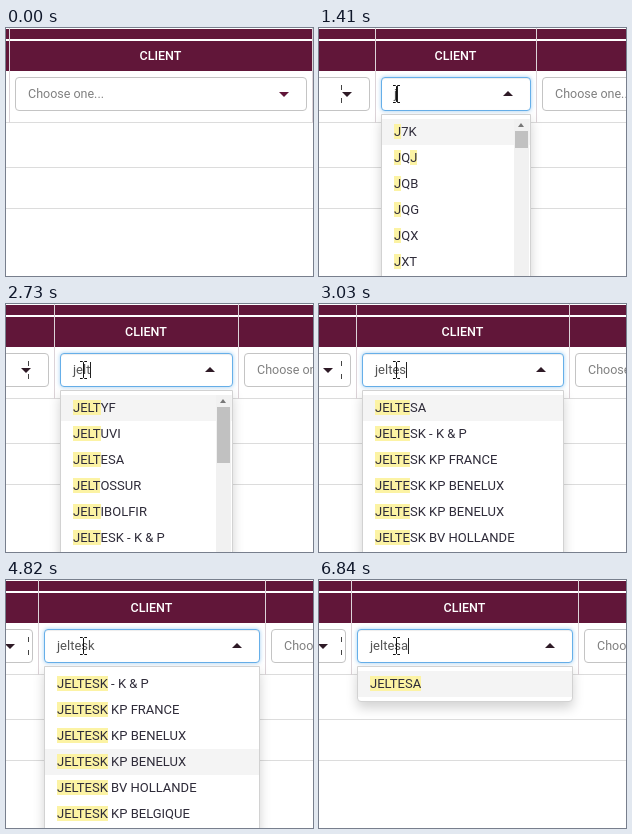
An HTML page for the animation above (6.92 s loop, 307 px wide and 248 px high).

```html
<!DOCTYPE html>
<html lang="en">
<head>
<meta charset="utf-8">
<title>Client picker</title>
<style>
  * { box-sizing: border-box; }
  html, body { margin: 0; width: 100%; height: 100%; overflow: hidden; background: #fff; }
  #stage {
    --l: 3px; --r: 306px;
    position: relative; width: 307px; height: 248px; overflow: hidden;
    background: #fff; color: #2f2c3a; font: 13px Roboto, sans-serif;
  }
  #stage div, #stage svg { position: absolute; }
  .band { left: 0; width: 100%; background: #611639; }
  .rule { left: 0; width: 100%; height: 1px; background: #dcdcdc; }
  .edge { top: 0; width: 1px; height: 95px; background: #dcd3d8; }
  .title {
    top: 13px; left: var(--l); width: calc(var(--r) - var(--l)); line-height: 29px;
    text-align: center; color: #fff; font-size: 12.5px; font-weight: 500;
  }
  .box {
    top: 49px; height: 34px; padding-left: 12px; line-height: 32px; white-space: nowrap;
    background: #fff; border: 1px solid #c4c4c4; border-radius: 4px; color: #555;
  }
  .hint { color: #808080; font-size: 12.5px; }
  .arrow { top: 14px; right: 17px; border: 5px solid transparent; border-top-color: #611639; border-bottom: 0; }
  .left { left: -150px; width: calc(var(--l) + 145px); }
  .left .arrow { border-top-color: #2e1a26; }
  .client { left: calc(var(--l) + 6px); width: calc(var(--r) - var(--l) - 11px); }
  .right { left: calc(var(--r) + 6px); width: 200px; }
  .focus .client { border-color: #66afe9; box-shadow: 0 1px 1px #00000013 inset, 0 0 4px #66afe999; }
  .focus .client .arrow { top: 13px; border: 5px solid transparent; border-bottom-color: #2e1a26; border-top: 0; }
  #caret { display: inline-block; width: 1px; height: 16px; margin-right: -1px; vertical-align: -4px; background: #222; }
  .tick { left: 22px; width: 1px; height: 5px; background: #444; visibility: hidden; }
  .focus .tick { visibility: visible; }
  #menu {
    top: 86px; left: calc(var(--l) + 6px); width: calc(var(--r) - var(--l) - 11px);
    padding: 4px 0; background: #fff; border: 1px solid #d2d2d2;
    border-radius: 0 0 4px 4px; box-shadow: 0 6px 12px #0000002d;
  }
  #menu.long { min-height: 204px; }
  #menu p { margin: 0; height: 26px; line-height: 26px; padding-left: 12px; white-space: nowrap; }
  #menu .active { background: #f4f4f4; }
  #menu b { font-weight: 400; background: #fcf3a4; }
  #bar { top: 4px; right: 1px; width: 15px; height: 196px; background: #f1f1f1; }
  #bar::before {
    content: ""; position: absolute; left: 4px; top: 4px;
    border: 3.5px solid transparent; border-bottom: 4px solid #777; border-top: 0;
  }
  #thumb { top: 12px; left: 1px; width: 13px; background: #c1c1c1; }
  #stage svg { left: 0; top: 0; overflow: visible; }
</style>
</head>
<body>
<div id="stage">
  <div class="band" style="top:1px;height:10px"></div>
  <div class="band" style="top:13px;height:30px"></div>
  <div class="rule" style="top:94px"></div>
  <div class="rule" style="top:139px"></div>
  <div class="rule" style="top:180px"></div>
  <div class="edge" style="left:var(--l)"></div>
  <div class="edge" style="left:var(--r)"></div>
  <div class="title">CLIENT</div>
  <div class="box left"><div class="arrow"></div></div>
  <div class="box right"><span class="hint">Choose one...</span></div>
  <div class="box client"><span id="typed"></span><i id="caret"></i><span class="hint" id="hint">Choose one...</span><div class="arrow"></div></div>
  <div class="tick" style="top:57px"></div>
  <div class="tick" style="top:70px"></div>
  <div id="menu"><section id="rows"></section><div id="bar"><div id="thumb"></div></div></div>
  <svg width="20" height="24"><path id="pointer" stroke-linejoin="round"/></svg>
</div>
<script>
const LOOP = 6920;
const $ = id => document.getElementById(id);
const stage = $('stage');

const codes = ['J7K', 'JQJ', 'JQB', 'JQG', 'JQX', 'JXT'];
const group = ['- K & P', 'KP FRANCE', 'KP BENELUX', 'KP BENELUX', 'BV HOLLANDE', 'KP BELGIQUE']
  .map(branch => 'JELTESK ' + branch);
const family = ['JELTESA', ...group.slice(0, 5)];

// query: [scroll thumb height, names]
const results = {
  '': [17, codes],
  j: [17, codes],
  je: [20, ['JEBUK', 'JEDUF', 'JEFOK', 'JEGUB', 'JEHOZ', 'JEKUV']],
  jelt: [56, ['JELTYF', 'JELTUVI', 'JELTESA', 'JELTOSSUR', 'JELTIBOLFIR', group[0]]],
  jelte: [0, family],
  jeltes: [0, family],
  jeltesk: [0, group],
  jeltesa: [0, ['JELTESA']]
};

// time, column left, column right, typed text, listed query, active row, caret
const states = [
  [0, 3, 306, '', null, 0, 0],
  [840, 3, 306, '', null, 0, 1],
  [910, 3, 306, '', '', 0, 1],
  [1240, 3, 306, '', '', 0, 0],
  [1410, 56, 217, 'j', 'j', 0, 1],
  [1870, 56, 217, 'je', 'je', 0, 1],
  [2650, 48, 232, 'jelt', 'je', 0, 1],
  [2730, 48, 232, 'jelt', 'jelt', 0, 1],
  [2880, 43, 241, 'jelte', 'jelte', 0, 1],
  [3030, 37, 250, 'jeltes', 'jelte', 0, 1],
  [3120, 37, 250, 'jeltes', 'jeltes', 0, 1],
  [3260, 32, 259, 'jeltesk', 'jeltes', 0, 1],
  [3340, 32, 259, 'jeltesk', 'jeltesk', 0, 1],
  [4290, 32, 259, 'jeltesk', 'jeltesk', 1, 0],
  [4520, 32, 259, 'jeltesk', 'jeltesk', 2, 0],
  [4820, 32, 259, 'jeltesk', 'jeltesk', 3, 0],
  [6000, 37, 250, 'jeltes', 'jeltesk', 3, 0],
  [6070, 37, 250, 'jeltes', 'jeltes', 0, 1],
  [6300, 32, 259, 'jeltesa', 'jeltes', 0, 1],
  [6380, 32, 259, 'jeltesa', 'jeltesa', 0, 1]
];

// path, fill, stroke
const shapes = {
  none: ['', 'none', 'none'],
  arrow: ['M.5 .5V16.5L4 13L6.5 18.5L9 17.5L6.5 12H11.5Z', '#fff', '#000'],
  hand: ['M5.5 13V2Q7 -.5 8.5 2V8L15 9.5Q16.5 10 16.5 12V15L14.5 21.5H6.5L1 14Q.5 11 3 11.5Z', '#fff', '#000'],
  beam: ['M0 .5H2.5L3.5 1.5L4.5 .5H7M3.5 1.5V16.5M0 17.5H2.5L3.5 16.5L4.5 17.5H7', 'none', '#111']
};

// time, shape, left, top
const moves = [
  [0, 'none', 0, 0],
  [70, 'arrow', 224, 222],
  [150, 'arrow', 168, 174],
  [230, 'arrow', 119, 132],
  [460, 'arrow', 107, 112],
  [530, 'arrow', 88, 83],
  [610, 'hand', 69, 65],
  [840, 'beam', 74, 57]
];

const at = (table, time) => table.findLast(row => row[0] <= time);

function showMenu(query, active) {
  const open = query !== null;
  $('menu').hidden = !open;
  $('menu').style.display = open ? '' : 'none';
  if (!open) return;
  const [thumb, names] = results[query];
  const mark = name => query ? name.replace(new RegExp(query, 'gi'), '<b>$&</b>') : name;
  $('rows').innerHTML = names.map((name, i) =>
    `<p class="${i === active ? 'active' : ''}">${mark(name.replace('&', '&amp;'))}</p>`).join('');
  $('menu').className = names.length > 1 ? 'long' : '';
  $('bar').style.display = thumb ? '' : 'none';
  $('thumb').style.height = thumb + 'px';
}

function showState([time, left, right, typed, query, active, caret]) {
  stage.style.setProperty('--l', left + 'px');
  stage.style.setProperty('--r', right + 'px');
  stage.className = time >= 840 ? 'focus' : '';
  $('typed').textContent = typed;
  $('hint').style.display = typed ? 'none' : '';
  $('caret').style.visibility = caret ? 'visible' : 'hidden';
  showMenu(query, active);
}

function showPointer([, shape, x, y]) {
  const [d, fill, stroke] = shapes[shape];
  const attributes = { d, fill, stroke, transform: `translate(${x} ${y})` };
  for (const key in attributes) $('pointer').setAttribute(key, attributes[key]);
}

const start = performance.now();
let state, move;

function draw() {
  const time = (performance.now() - start) % LOOP;
  const nextState = at(states, time), nextMove = at(moves, time);
  if (nextState !== state) showState(state = nextState);
  if (nextMove !== move) showPointer(move = nextMove);
  requestAnimationFrame(draw);
}
draw();
</script>
</body>
</html>
```
